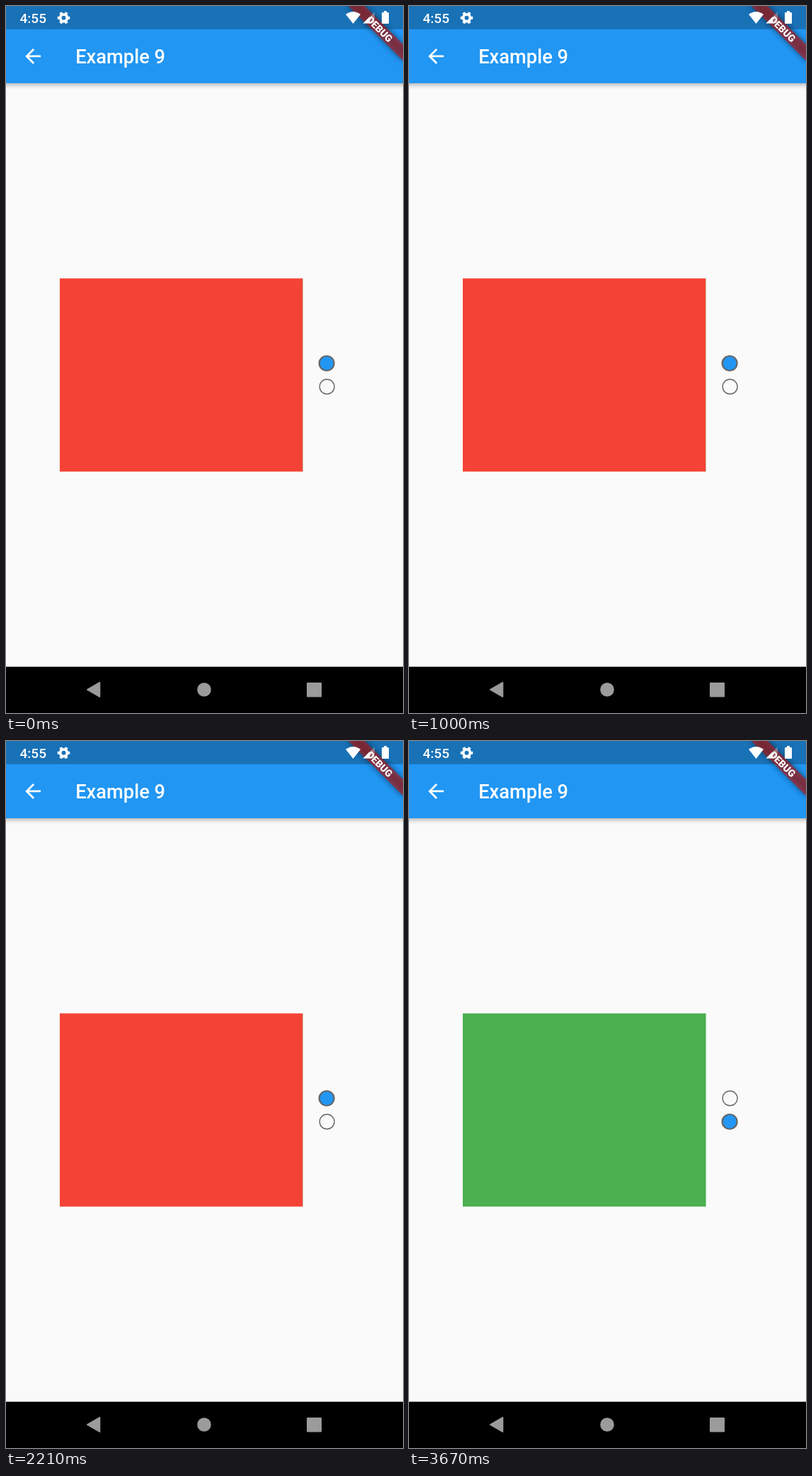
These frames come from a looping animation (561 by 998 pixels, 3.71 s). An HTML page:

```html
<!DOCTYPE html>
<html lang="en">
<head>
<meta charset="utf-8">
<title>Pager with indicator</title>
<style>
  html, body { margin: 0; width: 100%; height: 100%; overflow: hidden; background: #fafafa; }
  svg { display: block; }
  text { font-family: Roboto, sans-serif; font-weight: 500; fill: #fff; }
  .ring { fill: none; stroke: #666; stroke-width: 1.4; }
</style>
</head>
<body>
<svg width="561" height="998" viewBox="0 0 561 998">
  <defs>
    <filter id="soft" x="-50%" y="-50%" width="200%" height="200%"><feGaussianBlur stdDeviation="4"/></filter>
    <clipPath id="window"><rect x="76" y="384.6" width="343.6" height="272.7"/></clipPath>
  </defs>
  <rect width="561" height="998" fill="#fafafa"/>

  <!-- Pages -->
  <g clip-path="url(#window)">
    <g id="pages">
      <rect x="76" y="384" width="343.6" height="274" fill="#f44336"/>
      <rect x="419.6" y="384" width="344" height="274" fill="#4caf50"/>
    </g>
  </g>

  <!-- Page indicator -->
  <circle id="dot" cx="452.7" cy="504.4" r="10.5" fill="#2196f3" stroke="#666" stroke-width="1.4"/>
  <circle class="ring" cx="453.6" cy="504.4" r="10.4"/>
  <circle class="ring" cx="453.6" cy="537.4" r="10.4"/>

  <!-- App bar -->
  <rect x="-20" y="0" width="601" height="110" fill="#000" opacity=".4" filter="url(#soft)"/>
  <rect width="561" height="109" fill="#2196f3"/>
  <rect width="561" height="32.7" fill="#000" opacity=".25"/>
  <path transform="translate(21.8 54.6) scale(1.364)" fill="#fff"
        d="M20 11H7.83l5.59-5.59L12 4l-8 8 8 8 1.41-1.41L7.83 13H20z"/>
  <text x="98.2" y="81" font-size="27.27">Example 9</text>

  <!-- Corner banner -->
  <g transform="translate(561 0) rotate(45)">
    <rect x="-54.5" y="38.2" width="109" height="16.4" opacity=".5" filter="url(#soft)"/>
    <rect x="-54.5" y="38.2" width="109" height="16.4" fill="#b71c1c" opacity=".627"/>
    <text y="51.3" font-size="13.9" text-anchor="middle" style="font-weight:900">DEBUG</text>
  </g>

  <!-- Status icons -->
  <text x="19.5" y="24" font-size="19">4:55</text>
  <g fill="none" stroke="#fff" transform="translate(81.5 16.8)">
    <circle r="4.9" stroke-width="3.9"/>
    <circle r="7.4" stroke-width="2.8" pathLength="12" stroke-dasharray="1 1" stroke-dashoffset=".5"/>
  </g>
  <g fill="#fff">
    <path d="M490.5 25L480 11.8Q490.5 4 501 11.8Z"/>
    <path d="M504.5 24.5H521V8Z" opacity=".3"/>
    <path d="M504.5 24.5H514V15Z"/>
    <path d="M534 7h4v2h2q1 0 1 1v14q0 1-1 1h-8q-1 0-1-1v-14q0-1 1-1h2z"/>
  </g>

  <!-- Navigation bar -->
  <rect y="932.7" width="561" height="66"/>
  <g fill="#9b9b9b" stroke="#9b9b9b" stroke-width="2" stroke-linejoin="round">
    <path d="M115 965L132.3 955V975Z"/>
    <circle cx="280" cy="965" r="8.8"/>
    <rect x="426" y="956" width="19" height="18.5"/>
  </g>
</svg>
<script>
  const LOOP = 3710, FPS = 24;
  const PAGE_WIDTH = 343.6, DOT_GAP = 33, SWIPE = 400;
  const pages = document.getElementById('pages');
  const dot = document.getElementById('dot');

  // Progress of one swipe: soft start, long settling tail.
  function swipe(time, start) {
    const t = Math.min(1, Math.max(0, (time - start) / SWIPE));
    return 1 - (1 - t) ** 3 * (1 + 3 * t);
  }

  function draw(now) {
    const clock = now % LOOP;
    const time = Math.floor((clock + 5) * FPS / 1000) * 1000 / FPS;
    const page = swipe(time, 1040) - swipe(time, 1800) + swipe(time, 2632);
    pages.setAttribute('transform', `translate(${-page * PAGE_WIDTH} 0)`);
    dot.setAttribute('transform', `translate(0 ${page * DOT_GAP})`);
    requestAnimationFrame(draw);
  }
  requestAnimationFrame(draw);
</script>
</body>
</html>
```
